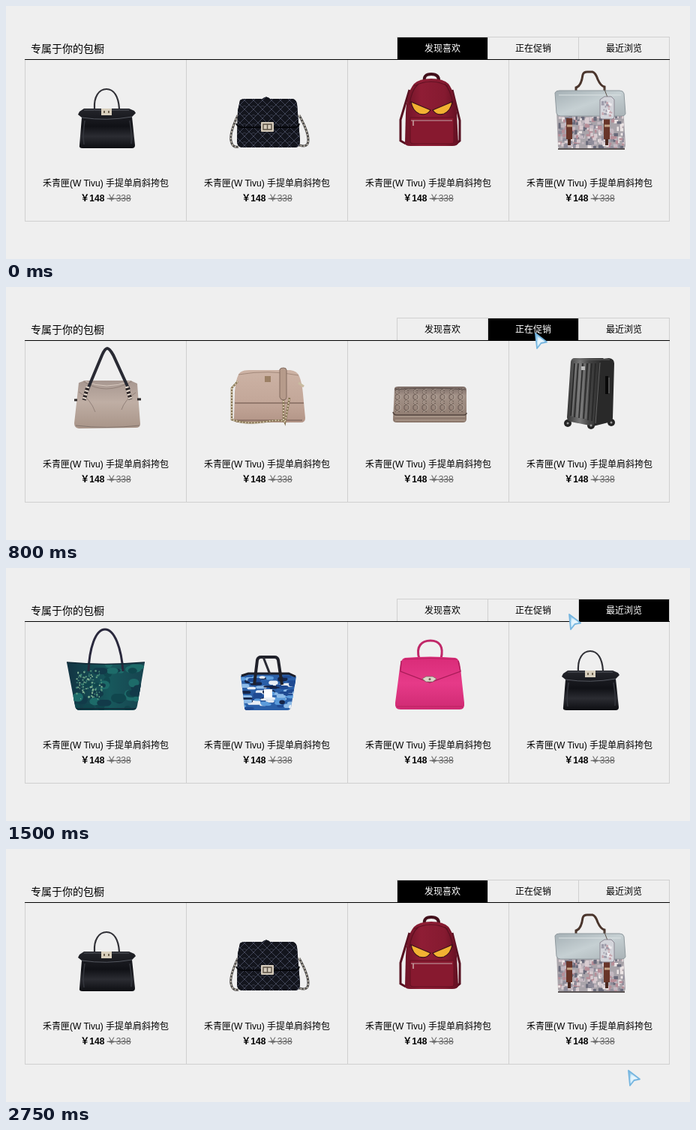
An HTML page that plays this animation: 912x338 px, repeating every 2.8 s.

```html
<!DOCTYPE html>
<html lang="zh-CN">
<head>
<meta charset="utf-8">
<title>包橱</title>
<style>
  html, body { margin: 0; width: 100%; height: 100%; overflow: hidden; background: #efefef; }
  svg { display: block; width: 100%; height: 100%; }
  text { font: 12px "Liberation Sans", "Noto Sans CJK SC", "Noto Sans CJK", sans-serif; text-anchor: middle; fill: #000; }
  #title { font-size: 14px; text-anchor: start; }
  .bold { font-weight: 700; }
  .old { fill: #666; text-decoration: line-through; }
  .crisp { shape-rendering: crispEdges; }
  .line { fill: none; }
</style>
</head>
<body>
<svg viewBox="0 0 912 338">
  <defs>
    <linearGradient id="black" x2="0" y2="1"><stop stop-color="#24252b"/><stop offset=".45" stop-color="#101116"/><stop offset=".7" stop-color="#2b2c32"/><stop offset="1" stop-color="#0d0e12"/></linearGradient>
    <linearGradient id="red"><stop stop-color="#6e1427"/><stop offset=".3" stop-color="#8f1d35"/><stop offset=".75" stop-color="#851a30"/><stop offset="1" stop-color="#631022"/></linearGradient>
    <linearGradient id="silver" x2="1" y2="1"><stop stop-color="#a5b0b5"/><stop offset=".5" stop-color="#c6d0d3"/><stop offset="1" stop-color="#a9b2b6"/></linearGradient>
    <linearGradient id="taupe" x2="0" y2="1"><stop stop-color="#a79790"/><stop offset=".45" stop-color="#bfaea4"/><stop offset="1" stop-color="#a89488"/></linearGradient>
    <linearGradient id="rose" x2="0" y2="1"><stop stop-color="#cdb3a5"/><stop offset=".6" stop-color="#c3a799"/><stop offset="1" stop-color="#b39587"/></linearGradient>
    <linearGradient id="wallet" x2="0" y2="1"><stop stop-color="#7c6c66"/><stop offset=".25" stop-color="#a39288"/><stop offset="1" stop-color="#8b776b"/></linearGradient>
    <linearGradient id="steel"><stop stop-color="#353535"/><stop offset=".35" stop-color="#777"/><stop offset=".6" stop-color="#444"/><stop offset="1" stop-color="#282828"/></linearGradient>
    <linearGradient id="teal"><stop stop-color="#123342"/><stop offset=".55" stop-color="#17585c"/><stop offset="1" stop-color="#17434f"/></linearGradient>
    <linearGradient id="pink" x2="0" y2="1"><stop stop-color="#d92b78"/><stop offset=".5" stop-color="#e63a88"/><stop offset="1" stop-color="#cf2a73"/></linearGradient>
    <linearGradient id="ice" x2="1" y2=".6"><stop stop-color="#5fa9d8"/><stop offset=".4" stop-color="#c9e9fa"/><stop offset="1" stop-color="#fff"/></linearGradient>
    <pattern id="quilt" width="12" height="12" patternUnits="userSpaceOnUse"><path d="M0 0L12 12M12 0L0 12" stroke="#454a5c" stroke-width=".9"/><path d="M3 3L6 1L9 3" class="line" stroke="#343846"/></pattern>
    <pattern id="emboss" width="12" height="14" patternUnits="userSpaceOnUse"><path d="M3 1L9 5V9L3 13M9 1L3 5V9L9 13" class="line" stroke="#65564f" stroke-width="1"/><path d="M4 1L10 5V9L4 13" class="line" stroke="#c2b3a8" stroke-width=".7"/></pattern>
    <clipPath id="printClip"><path d="M737 146H823L825 187Q825 190 821 190H740Q736 190 736 187Z"/></clipPath>
    <clipPath id="tealClip"><path id="tealBody" d="M81 126Q132 131 185 126L175 184Q174 190 169 190H98Q93 190 92 184Z"/></clipPath>
    <clipPath id="camoClip"><path id="camoBody" d="M313 144L322 142H378L387 145L380 186Q379 190 375 190H321Q318 190 318 186Z"/></clipPath>

    <g id="handbag">
      <path d="M118 137C117 121 124 111 134 111S150 121 151 137" class="line" stroke="#303036" stroke-width="2.2"/>
      <path d="M98 141L104 137H164L171 140L173 143L168 148L172 186Q172 190 168 190H102Q97 190 98 186L101 149L96 145Z" fill="url(#black)"/>
      <path d="M101 149Q134 154 168 148M104 139H164" class="line" stroke="#555860"/>
      <path d="M105 153Q102 172 104 185M165 153Q168 170 167 184" class="line" stroke="#34363d" stroke-width="1.5"/>
      <rect x="127" y="137" width="14" height="9" fill="#d8cfbd"/>
      <path d="M130 140H132V143H130ZM136 140H138V143H136Z" fill="#6d6250"/>
    </g>
  </defs>

  <g class="crisp">
    <path d="M521.5 71V41.5H884.5V71M642.5 41V71M763.5 41V71M25.5 72V287.5H884.5V72M240.5 72V287M455.5 72V287M670.5 72V287" class="line" stroke="#d0d0d0"/>
    <rect id="active" y="42" width="120" height="29"/>
    <rect x="25" y="71" width="860" height="1"/>
  </g>
  <text id="title" x="33" y="62">专属于你的包橱</text>
  <g id="labels"></g>

  <g class="set">
    <use href="#handbag"/>

    <path d="M309 146Q298 170 300 180T310 188M391 146Q403 168 403 179T391 186" class="line" stroke="#4d4b4a" stroke-width="3"/>
    <path d="M309 146Q298 170 300 180T310 188M391 146Q403 168 403 179T391 186" class="line" stroke="#c9c3b5" stroke-width="1.6" stroke-dasharray="2 2.5"/>
    <path id="quilted" d="M312 126Q314 124 320 124H342Q347 119 352 124H382Q387 125 388 131L392 180Q392 189 385 189H315Q308 188 308 181L309 140Z" fill="#13151d"/>
    <use href="#quilted" style="fill:url(#quilt)"/>
    <path d="M312 126Q314 124 320 124H342Q347 119 352 124H382Q387 125 388 131L392 180Q392 189 385 189H315Q308 188 308 181L309 140Z" fill="url(#quilt)"/>
    <path d="M307 157Q309 162 315 162H385Q390 162 391 157" class="line" stroke="#05060a" stroke-width="2"/>
    <rect x="340" y="155" width="17" height="13" rx="1" fill="#d5cbbb"/>
    <path d="M343 158H354V165H343ZM348.500 158V165" class="line" stroke="#5b5246" stroke-width="1.4"/>

    <path d="M558 101Q556 91 567 91T577 101" class="line" stroke="#42101b" stroke-width="4"/>
    <path d="M538 112L526 152V180L533 184M595 112L605 153V180L600 184" class="line" stroke="#561020" stroke-width="3"/>
    <path d="M532 183L533 143Q534 116 544 104Q551 97 567 97T590 104Q599 116 601 143L603 183Q602 187 595 187H539Q532 187 532 183Z" fill="url(#red)"/>
    <path d="M538 132Q540 113 550 104M596 132Q593 112 585 104M544 107Q567 95 589 107" class="line" stroke="#5d1021" stroke-width="1.2"/>
    <path d="M540 128L566 139Q561 147 551 144Q542 140 540 128ZM595 128L569 139Q574 147 584 144Q593 140 595 128Z" fill="#f2b132" stroke="#3b111a" stroke-width="1.2"/>
    <path d="M539 149H597V181Q597 184 592 184H543Q539 184 539 181Z" fill="#87192f" stroke="#621021"/>
    <path d="M540 153H595" stroke="#b0777f" stroke-width="1.5"/><path d="M543 153V160" stroke="#c8a8a7" stroke-width="1.5"/>

    <path d="M760 114V109Q767 107 769 92Q770 88 775 88H782Q786 89 789 98Q793 107 798 108V114" class="line" stroke="#4a352c" stroke-width="3"/>
    <path d="M734 139L736 187Q736 191 741 191H821Q826 191 826 186L823 133Z" fill="#a9a4aa"/>
    <g id="town" clip-path="url(#printClip)"></g>
    <path d="M732 116Q733 113 738 113H818Q823 113 824 117L826 144Q825 147 821 147H739Q735 147 734 143Z" fill="url(#silver)" stroke="#8f999e"/>
    <path d="M737 119H820" stroke="#dbe2e3"/><path d="M736 191H825" stroke="#5b5555" stroke-width="2"/>
    <path d="M751 150V178M801 150V178" stroke="#683529" stroke-width="8"/>
    <path d="M748 160H755M798 160H805" stroke="#c5a589" stroke-width="3"/>
    <path d="M751 178V186M801 178V186" stroke="#49271f" stroke-width="4"/>
    <path d="M797 109L802 122" stroke="#5b5148"/>
    <path d="M792 125L798 121H807L811 125V148Q811 151 808 151H795Q792 151 792 148Z" fill="#d3d4da" stroke="#8b8792"/>
    <g id="tag"></g>
  </g>

  <g class="set">
    <path d="M97 128L105 125H166L175 129L179 183Q179 188 173 188L97 189Q91 188 91 182Z" fill="url(#taupe)"/>
    <path d="M103 126Q132 146 168 126M97 140Q113 150 119 167M173 141Q158 151 154 164" class="line" stroke="#93827a"/>
    <path d="M106 126Q133 138 165 126" class="line" stroke="#d7c9bf"/>
    <path d="M108 139L128 91Q132 82 135 82T143 91L164 137" class="line" stroke="#292a33" stroke-width="4"/>
    <path d="M109 133L104 151M161 133L166 150" stroke="#30292a" stroke-width="5"/>
    <path d="M109 133L104 151M161 133L166 150" stroke="#eee1d4" stroke-width="5" stroke-dasharray="2 3"/>
    <path d="M91 151H95M175 150H180" stroke="#302b2b" stroke-width="3"/>
    <path d="M93 185Q134 190 178 185" class="line" stroke="#83746c"/>

    <path id="shell" d="M305 140Q307 116 314 113Q317 111 324 111H379Q388 112 391 119Q395 129 396 143L399 175Q399 181 393 181H310Q303 181 304 175Z" fill="url(#rose)"/>
    <path d="M305 155H397M308 178H395" stroke="#846b60" stroke-width="1.3"/>
    <path d="M310 117Q350 110 390 118" class="line" stroke="#a48a7c"/>
    <path d="M309 126L301 135V177Q320 184 345 180T372 181L378 148M370 148V179" class="line" stroke="#837151" stroke-width="2.6"/>
    <path d="M309 126L301 135V177Q320 184 345 180T372 181L378 148M370 148V179" class="line" stroke="#e0d3b7" stroke-width="1.6" stroke-dasharray="2 2"/>
    <path d="M365 110Q366 108 370 108T374 111V147Q374 151 370 151T365 147Z" fill="#b69b8b" stroke="#826b5f"/>
    <path d="M390 128L397 133" stroke="#c9bba0" stroke-width="3"/>
    <rect x="345" y="119" width="8" height="8" fill="#9c8065"/>

    <path d="M518 135Q519 133 523 133H609Q614 133 614 138V176Q614 181 609 181H521Q516 181 516 177Z" fill="url(#wallet)"/>
    <path d="M519 135H613V168H518Z" fill="url(#emboss)"/>
    <path d="M518 137Q565 133 613 137" class="line" stroke="#5a4d49"/>
    <path d="M516 167Q517 171 521 171H610Q614 171 614 168" class="line" stroke="#554740" stroke-width="1.6"/>
    <path d="M518 173H612M519 178H612" stroke="#bcaa9c"/>

    <g fill="#242424"><circle cx="749" cy="182" r="5"/><circle cx="780" cy="185" r="5"/><circle cx="807" cy="181" r="5"/></g>
    <path d="M786 97L804 95Q811 96 811 102L809 175Q808 180 803 181L779 187Z" fill="#292929"/>
    <path d="M758 95H797Q795 98 791 100L784 183Q783 186 778 185L753 180Q748 179 748 174L753 100Q754 95 758 95Z" fill="url(#steel)"/>
    <path d="M758 102L753 172M763 102L758 174M769 102L764 175M775 102L770 176M781 102L776 178M786 102L781 179" stroke="#262626" stroke-width="1.5"/>
    <path d="M760 102L755 173M766 102L761 174M772 102L767 175M778 102L773 176" stroke="#8a8a8a" stroke-width=".8"/>
    <path d="M755 97H805M792 101L786 182" class="line" stroke="#666"/>
    <path d="M801 119V143" stroke="#090909" stroke-width="4"/><path d="M804 121V142" stroke="#777"/>
    <rect x="767" y="106" width="5" height="5" fill="#bbb"/>
    <g fill="#999"><circle cx="749" cy="182" r="1.500"/><circle cx="780" cy="185" r="1.500"/><circle cx="807" cy="181" r="1.500"/></g>
  </g>

  <g class="set">
    <use href="#tealBody" fill="url(#teal)"/>
    <g clip-path="url(#tealClip)"><g id="mist"></g><g id="petals"></g></g>
    <path d="M110 138C111 108 119 82 132 82S154 108 156 138" class="line" stroke="#29283c" stroke-width="3"/>
    <path d="M81 126Q132 131 185 126M94 188H173" class="line" stroke="#102936" stroke-width="1.500"/>

    <use href="#camoBody" fill="#2a5fa8"/>
    <g id="camo" clip-path="url(#camoClip)"></g>
    <path d="M314 144L323 141H377L386 145" class="line" stroke="#1b1d28" stroke-width="3"/>
    <path d="M331 156L335 123Q336 119 340 119H358Q362 119 363 123L368 156" class="line" stroke="#20212a" stroke-width="4"/>
    <path d="M343 119L352 142" stroke="#292a33" stroke-width="3"/>
    <rect x="344" y="162" width="11" height="11" fill="#fff"/>

    <path d="M551 121C546 105 554 97 566 97S584 105 580 121" class="line" stroke="#c02768" stroke-width="3"/>
    <path d="M532 120Q566 117 599 120Q605 121 606 134L611 180Q612 189 605 189H526Q518 189 519 180L525 134Q526 121 532 120Z" fill="url(#pink)"/>
    <path d="M527 124L526 138L565 153L606 138L603 124" class="line" stroke="#a91c58" stroke-width="1.300"/>
    <path d="M531 122Q566 119 601 122M521 185H609" class="line" stroke="#b9225f"/>
    <path d="M555 148L560 145H569L574 148L569 152H560Z" fill="#ddd5c8" stroke="#7d6863" stroke-width=".8"/>
    <circle cx="565" cy="148.500" r="1.500" fill="#6d5d58"/>
    <use href="#handbag" x="645"/>
  </g>

  <g id="cards"></g>
  <g id="cursor">
    <path d="M1 1L16 12.500L8.500 14L3 21Z" fill="url(#ice)" stroke="#75b5df" stroke-width="1.800" stroke-linejoin="round"/>
    <path d="M4 6L11 11.500L7 12.500L4.500 16Z" fill="#fff" opacity=".45"/>
  </g>
</svg>
<script>
const $ = id => document.getElementById(id);
const LOOP = 2800, STEP = 50;
const sets = [...document.querySelectorAll('.set')];

function randomizer(seed) {
  return () => (seed = seed * 16807 % 2147483647) / 2147483647;
}

// Fills a group with small seeded flecks inside a box.
function scatter(id, colors, count, [x, y, w, h], [fleckW, fleckH], radius = 0) {
  const random = randomizer(count * 97 + x);
  $(id).innerHTML = Array.from({ length: count }, (_, i) => {
    const fw = fleckW * (.4 + random() * .6), fh = fleckH * (.4 + random() * .6);
    return `<rect x="${x + random() * w - fw / 2}" y="${y + random() * h - fh / 2}" width="${fw}" height="${fh}" rx="${radius}" fill="${colors[i % colors.length]}"/>`;
  }).join('');
}

scatter('town', ['#d8cbd0', '#8f8c9a', '#ece5e5', '#b78e98', '#696a7a', '#c4b9c1'], 230, [736, 147, 90, 43], [6, 6]);
scatter('tag', ['#9c9aa8', '#c4a2ab', '#efedf0'], 26, [795, 128, 13, 19], [4, 4]);
scatter('mist', ['#1d6b69', '#123a49', '#10464d'], 40, [82, 127, 100, 62], [20, 12], 6);
scatter('petals', ['#5f9c82', '#86b595', '#3d8275'], 85, [94, 137, 34, 39], [3, 3], 1.5);
scatter('camo', ['#152448', '#5b9bdb', '#e8eef5', '#1f4a92', '#8dbbe8'], 75, [314, 145, 72, 44], [18, 6], 3);

$('labels').innerHTML = ['发现喜欢', '正在促销', '最近浏览']
  .map((label, i) => `<text x="${582 + 121 * i}" y="61">${label}</text>`).join('');
const labels = [...$('labels').children];

$('cards').innerHTML = [0, 1, 2, 3].map(i => `<g transform="translate(${133 + 215 * i})">
  <text y="241">禾青匣(W Tivu) 手提单肩斜挎包</text>
  <text y="261"><tspan class="bold">￥148</tspan> <tspan class="old">￥338</tspan></text></g>`).join('');

// Time, x and y of the pointer tip.
const path = [
  [50, 818, 244], [400, 818, 244], [750, 693, 60], [850, 716, 61], [1200, 716, 61],
  [1250, 757, 61], [1350, 806, 61], [1400, 806, 61], [1500, 750, 61], [1950, 750, 61],
  [2000, 698, 61], [2050, 672, 61], [2200, 672, 61], [2300, 617, 61], [2450, 588, 62],
  [2600, 588, 62], [2750, 829, 295]
];
const switches = [[0, 0], [800, 1], [1350, 2], [2000, 1], [2300, 0]];

function pointerAt(t) {
  const next = Math.max(1, path.findIndex(p => p[0] >= t));
  const [t0, x0, y0] = path[next - 1], [t1, x1, y1] = path[next];
  const k = (t - t0) / (t1 - t0);
  return [x0 + (x1 - x0) * k, y0 + (y1 - y0) * k].map(Math.round);
}

function draw(now) {
  const t = Math.floor(now % LOOP / STEP) * STEP;
  const tab = switches.filter(([start]) => start <= t).pop()[1];
  $('active').setAttribute('x', 522 + 121 * tab);
  labels.forEach((label, i) => label.style.fill = i === tab ? '#fff' : '#000');
  sets.forEach((set, i) => set.style.display = i === tab ? '' : 'none');
  $('cursor').style.display = t ? '' : 'none';
  if (t) $('cursor').setAttribute('transform', `translate(${pointerAt(t)})`);
}

function loop() {
  draw(performance.now());
  requestAnimationFrame(loop);
}
loop();
</script>
</body>
</html>
```
